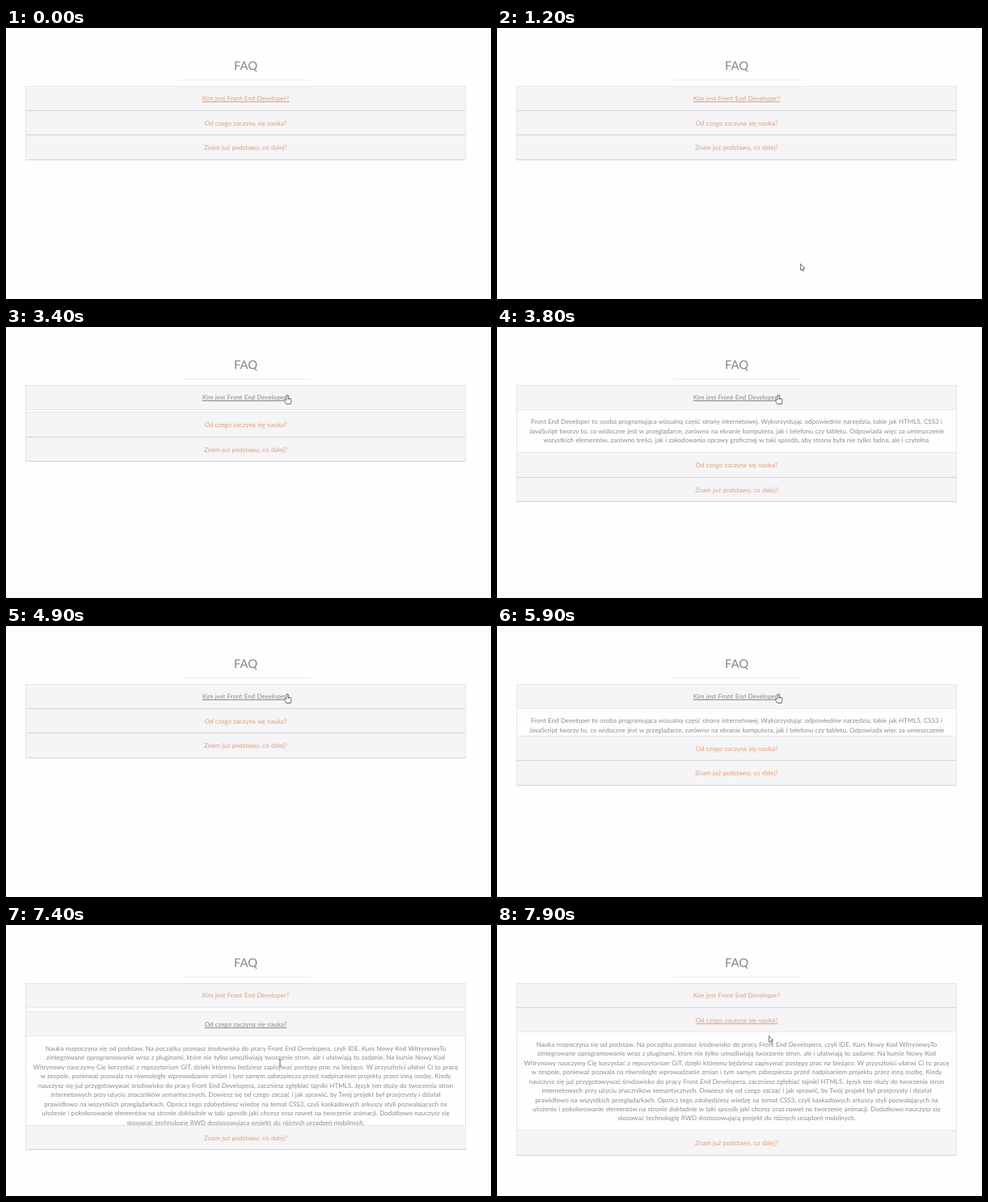
An HTML page for the animation above (8000 ms loop, 600 by 336 pixels).

```html
<!DOCTYPE html>
<html lang="pl">
<head>
<meta charset="utf-8">
<title>FAQ</title>
<style>
  html, body { margin: 0; width: 100%; height: 100%; overflow: hidden; background: #fefdff; }
  body {
    position: relative;
    font: 7.97px Lato, "Open Sans", sans-serif;
    word-spacing: .04em;
    color: #8e8c8e;
    text-align: center;
    text-rendering: geometricPrecision;
  }
  h1 {
    position: absolute; left: 24px; top: 37px; width: 545px; margin: 0;
    font-size: 14.8px; font-weight: 400; line-height: 20px; color: #868586;
  }
  .rule { position: absolute; left: 218px; top: 64px; width: 158px; height: 1px; background: #eeecef; }
  .list { position: absolute; left: 24px; top: 72px; width: 545px; }
  .list::before { content: ""; position: absolute; left: 0; top: 0; width: 100%; height: 1px; background: #e5e4e7; }
  .panel { border: solid #e5e4e7; border-width: 0 1px 1px; }
  /* The shadow darkens the panel's bottom border while the panel is closed. */
  .head { height: 29.5px; line-height: 30px; background: #f5f4f6; box-shadow: 0 1px rgba(0, 0, 0, .08); }
  .link {
    color: #dfa07a;
    text-decoration: underline transparent;
    text-decoration-thickness: 1px;
    text-underline-offset: 1px;
    text-decoration-skip-ink: none;
  }
  .body { height: 0; overflow: hidden; }
  .text { padding-top: 10.9px; line-height: 11.43px; white-space: pre; }
  .text span { display: block; margin: 0 -20px; }
  svg { position: absolute; left: 0; top: 0; width: 1px; height: 1px; overflow: visible; }
  svg path { fill: #fff; stroke: #4a494b; stroke-width: .8; stroke-linejoin: round; }
  svg .beam { fill: none; }
</style>
</head>
<body>
<h1>FAQ</h1>
<div class="rule"></div>
<div class="list"></div>
<svg id="pointer">
  <path class="arrow" d="M.4.4V8.2L2.1 6.7L3.3 9.3L4.7 8.7L3.5 6.1H5.7Z"/>
  <path class="hand" d="M-1.1 6.6V1.1Q0-.7 1.1 1.1V4.1L4.2 5Q5.2 5.4 5 6.8L4.2 11.5H-1.2L-3.6 7.4Q-3.6 5.6-2 6.1L-1.1 7.2M1.1 4.1V6M2.7 4.5V6.2"/>
  <path class="beam" d="M-1.5-4H1.5M0-4V4M-1.5 4H1.5"/>
</svg>
<script>
const LOOP = 8000, STEP = 100;
const ORANGE = '#dfa07a', GREY = '#8a8887', NONE = 'transparent';

const entries = [
  ['Kim jest Front End Developer?', [
    'Front End Developer to osoba programująca wizualną część strony internetowej. Wykorzystując odpowiednie narzędzia, takie jak HTML5, CSS3 i',
    'JavaScript tworzy to, co widoczne jest w przeglądarce, zarówno na ekranie komputera, jak i telefonu czy tabletu. Odpowiada więc za umieszczenie',
    'wszystkich elementów, zarówno treści, jak i zakodowania oprawy graficznej w taki sposób, aby strona była nie tylko ładna, ale i czytelna.'
  ]],
  ['Od czego zaczyna się nauka?', [
    'Nauka rozpoczyna się od podstaw. Na początku poznasz środowisko do pracy Front End Developera, czyli IDE. Kurs Nowy Kod WitrynowyTo',
    'zintegrowane oprogramowanie wraz z pluginami, które nie tylko umożliwiają tworzenie stron, ale i ułatwiają to zadanie. Na kursie Nowy Kod',
    'Witrynowy nauczymy Cię korzystać z repozytorium GIT, dzięki któremu będziesz zapisywać postępy prac na bieżąco. W przyszłości ułatwi Ci to pracę',
    'w zespole, ponieważ pozwala na równoległe wprowadzanie zmian i tym samym zabezpiecza przed nadpisaniem projektu przez inną osobę. Kiedy',
    'nauczysz się już przygotowywać środowisko do pracy Front End Developera, zaczniesz zgłębiać tajniki HTML5. Język ten służy do tworzenia stron',
    'internetowych przy użyciu znaczników semantycznych. Dowiesz się od czego zacząć i jak sprawić, by Twój projekt był przejrzysty i działał',
    'prawidłowo na wszystkich przeglądarkach. Oprócz tego zdobędziesz wiedzę na temat CSS3, czyli kaskadowych arkuszy styli pozwalających na',
    'ułożenie i pokolorowanie elementów na stronie dokładnie w taki sposób jaki chcesz oraz nawet na tworzenie animacji. Dodatkowo nauczysz się',
    'stosować technologię RWD dostosowującą projekt do różnych urządzeń mobilnych.'
  ]],
  ['Znam już podstawy, co dalej?', []]
];

document.querySelector('.list').innerHTML = entries.map(([question, lines]) => `
  <div class="panel">
    <div class="head"><span class="link">${question}</span></div>
    <div class="body"><div class="text">${lines.map(line => `<span>${line}</span>`).join('')}</div></div>
  </div>`).join('');

const links = document.querySelectorAll('.link');
const bodies = document.querySelectorAll('.body');
const pointer = document.getElementById('pointer');
const tracks = [];

// keys: [time, value]; the first value also holds from 0, the last one to the end.
function track(el, prop, keys, easing) {
  const all = [[0, keys[0][1]], ...keys, [LOOP, keys[keys.length - 1][1]]];
  const frames = all.map(([time, value]) => ({ offset: time / LOOP, [prop]: value, easing }));
  const anim = el.animate(frames, { duration: LOOP, fill: 'both' });
  anim.pause();
  tracks.push(anim);
}

const hold = (el, prop, keys) => track(el, prop, keys, 'step-end');

// Each toggle opens or closes the body over 350 ms.
function toggle(el, height, starts) {
  const size = i => (i % 2 ? height : 0) + 'px';
  track(el, 'height', starts.flatMap((time, i) => [[time, size(i)], [time + 350, size(i + 1)]]), 'ease');
}

toggle(bodies[0], 53.5, [3370, 4560, 5770, 7180]);
toggle(bodies[1], 122.3, [7180]);

hold(links[0], 'color', [[0, ORANGE], [3100, GREY], [6300, ORANGE]]);
hold(links[0], 'textDecorationColor', [[0, ORANGE], [3100, GREY], [6300, ORANGE], [7200, NONE]]);
hold(links[1], 'color', [[0, ORANGE], [6900, GREY], [7600, ORANGE]]);
hold(links[1], 'textDecorationColor', [[0, NONE], [6900, GREY], [7600, ORANGE]]);

track(pointer, 'transform', [
  [1000, 425, 332], [1300, 350, 272], [1600, 282, 237], [1800, 271, 229], [2200, 275, 228],
  [2500, 275, 228], [2800, 312, 160], [3000, 350, 98], [3100, 354, 80], [3200, 348, 84],
  [6200, 348, 84], [6500, 343, 118], [6800, 331, 162], [7000, 339, 171],
  [7500, 339, 171], [7900, 336, 137]
].map(([time, x, y]) => [time, `translate(${x}px, ${y}px)`]), 'linear');

const shapes = [
  [0, ''], [1000, 'arrow'], [3100, 'hand'], [6300, 'arrow'], [6500, 'beam'],
  [6700, 'arrow'], [6900, 'hand'], [7300, 'beam'], [7800, 'arrow']
];
for (const name of ['arrow', 'hand', 'beam']) {
  hold(pointer.querySelector('.' + name), 'opacity', shapes.map(([time, shape]) => [time, shape === name ? 1 : 0]));
}

const start = performance.now();
function render() {
  const time = (performance.now() - start) % LOOP;
  const tick = Math.floor(time / STEP) * STEP;
  for (const anim of tracks) anim.currentTime = tick;
  requestAnimationFrame(render);
}
render();
</script>
</body>
</html>
```
